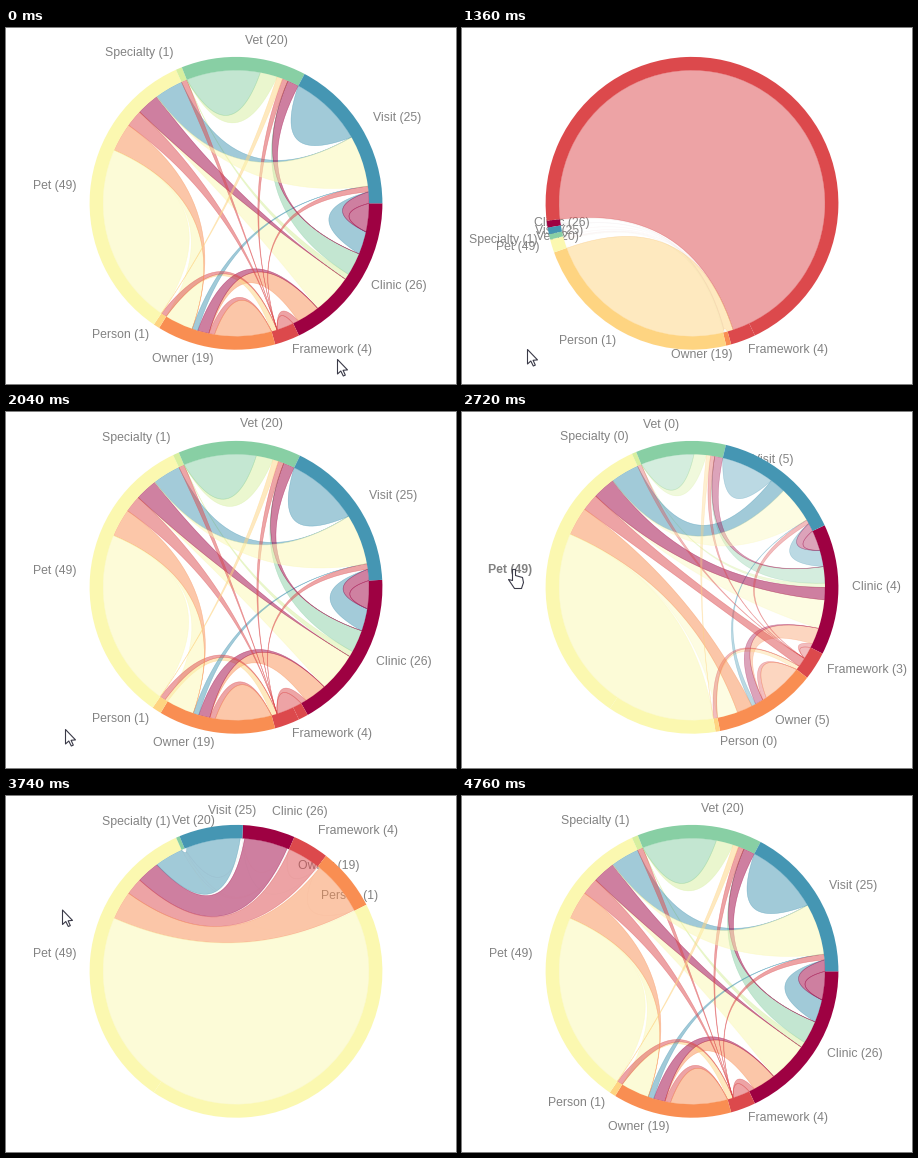
Write a matplotlib script that moves like this. It is 450 px wide and 356 px high and loops after 5120 ms.

```python
import numpy as np
import matplotlib.pyplot as plt
from matplotlib.animation import FuncAnimation
from matplotlib.patches import Polygon, Wedge

WIDTH, HEIGHT, DPI = 450, 356, 100
LOOP, TICK, STEP = 5120, 20, 340
CENTER = np.array([230.0, 175.3])
OUTER, INNER, LABEL_R = 146.4, 133, 160

COLORS = {"Clinic": "#9e0142", "Framework": "#dc494c", "Owner": "#f98e52",
          "Person": "#fed481", "Pet": "#fbf8b0", "Specialty": "#d7ef9f",
          "Vet": "#88cfa4", "Visit": "#4596b3"}
NAMES = list(COLORS)
N = len(NAMES)

# References from each group to the others
REFERENCES = {
    "Clinic": dict(Clinic=5, Visit=4, Vet=4, Specialty=1, Pet=7, Owner=4, Framework=1),
    "Framework": dict(Framework=3, Person=1),
    "Owner": dict(Owner=10, Framework=1, Clinic=2, Visit=1, Pet=5),
    "Person": dict(Framework=1),
    "Pet": dict(Pet=32, Owner=5, Framework=3, Clinic=4, Visit=5),
    "Specialty": dict(Framework=1),
    "Vet": dict(Vet=13, Specialty=3, Person=1, Framework=1, Clinic=2),
    "Visit": dict(Visit=13, Pet=9, Framework=1, Clinic=2),
}
LINKS = np.array([[REFERENCES[a].get(b, 0) for b in NAMES] for a in NAMES])
TOTALS = LINKS.sum(axis=1)
UNIT = 360 / TOTALS.sum()
ENDS = np.cumsum(TOTALS) * UNIT
STARTS = ENDS - TOTALS * UNIT

# (start, duration, group, pointer enters it)
HOVERS = [(57, 1087, "Framework", True), (1121, 1087, "Framework", False),
          (2327, 955, "Pet", True), (3513, 1172, "Pet", False)]

# Pointer path as (time, x, y)
POINTER_PATH = [(0, 331, 331), (680, 330, 323), (1020, 330, 323), (1360, 65, 321),
                (2040, 59, 317), (2380, 50, 157), (3400, 50, 157), (4080, 62, 70)]
ARROW = [(0, 0), (0, 14.5), (3.3, 11.5), (5.8, 16.5), (7.8, 15.6), (5.6, 10.8), (10, 10.4)]
HAND = [(0, 0), (3, 0), (3, 6), (10, 8), (11, 13), (9, 19), (2, 19), (-4, 10), (0, 11)]


def ease(u):
    u = min(max(u, 0), 1)
    return 4 * u**3 if u < 0.5 else 1 - 4 * (1 - u)**3


def hover_state(t):
    """Focused group, how far the focus has opened, and whether it is hovered."""
    state = None, 0, False
    for start, duration, name, enters in HOVERS:
        if t >= start:
            p = ease((t - start) / duration)
            state = NAMES.index(name), p if enters else 1 - p, enters
    return state


def polar(radius, degrees):
    a = np.radians(degrees)
    return CENTER + radius * np.stack([np.cos(a), np.sin(a)], axis=-1)


def arc(a, b):
    return polar(INNER, np.linspace(a, b, int(abs(b - a) / 2) + 3))


def curve(a, b):
    """Quadratic curve whose control reaches the centre for distant ends."""
    gap = (b - a + 180) % 360 - 180
    pull = max(0, 1 - abs(gap) / 90)**2.25
    control = polar(INNER * pull, a + gap / 2)
    t = np.linspace(0, 1, 30)[:, None]
    return ((1 - t)**2 * polar(INNER, a) + 2 * t * (1 - t) * control
            + t**2 * polar(INNER, b))


def share(focus):
    """Degrees per reference when the focused group divides the rest of the ring."""
    return (360 - TOTALS[focus] * UNIT) / TOTALS[focus]


def spans(focus, p):
    """Start and end angle of every group; the focused one keeps its place."""
    if focus is None:
        return list(zip(STARTS, ENDS))
    result = [None] * N
    result[focus] = STARTS[focus], ENDS[focus]
    pos = ENDS[focus]
    for k in range(1, N):
        j = (focus + k) % N
        width = TOTALS[j] * UNIT * (1 - p) + p * share(focus) * LINKS[focus, j]
        result[j] = pos, pos + width
        pos += width
    return result


def slots(groups, focus, p):
    """Outgoing slot of each pair, and where the focused group's links land."""
    out, landing = {}, {}
    for i in range(N):
        pos = groups[i][0]
        scale = UNIT if i == focus or focus is None else UNIT * (1 - p)
        for k in range(N):
            j = (i - k) % N
            if j == focus and i != focus:
                width = p * share(focus) * LINKS[focus, i]
                landing[i] = pos, pos + width
                pos += width
            out[i, j] = pos, pos + LINKS[i, j] * scale
            pos = out[i, j][1]
    if focus is not None:
        landing[focus] = groups[focus - 1][1], groups[focus][0] + 360
    return out, landing


def draw_chords(groups, focus, p):
    out, landing = slots(groups, focus, p)
    for i, j in zip(*np.nonzero(LINKS)):
        a0, a1 = out[i, j]
        b0, b1 = landing[j] if i == focus else (out[j, i][0],) * 2
        alpha = 0.5 if i == focus else 0.5 * (1 - p)
        color = COLORS[NAMES[j]]
        points = np.vstack([arc(a0, a1), curve(a1, b0), arc(b0, b1), curve(b1, a0)])
        ax.add_patch(Polygon(points, facecolor=color, edgecolor=color,
                             lw=0.4, alpha=alpha, zorder=2))


def draw_ring(groups, focus):
    pieces = [(name, *span) for name, span in zip(NAMES, groups)]
    if focus is not None:
        pieces.append((NAMES[focus], groups[focus - 1][1], groups[focus][0] + 360))
    for name, a, b in pieces:
        if b - a > 0.02:
            ax.add_patch(Wedge(CENTER, OUTER, a, b, width=OUTER - INNER,
                               facecolor=COLORS[name], lw=0, zorder=3))


def draw_labels(groups, focus, over):
    goal = spans(focus if over else None, 1)
    for j, name in enumerate(NAMES):
        x, y = polar(LABEL_R, sum(groups[j]) / 2)
        hovered = over and j == focus
        count = LINKS[focus, j] if over and not hovered else TOTALS[j]
        left = np.cos(np.radians(sum(goal[j]) / 2)) < 0
        ax.text(x, y, f"{name} ({count})", ha="right" if left else "left", va="baseline",
                family="Liberation Sans", size=12.3 * 72 / DPI, color="#828282",
                weight="bold" if hovered else "normal", zorder=1)


def draw_pointer(t, over):
    times, xs, ys = zip(*POINTER_PATH)
    if t > times[-1]:
        return
    tip = np.array([np.interp(t, times, xs), np.interp(t, times, ys)]) + 0.5
    shape = tip + np.array(HAND if over else ARROW)
    ax.add_patch(Polygon(shape, facecolor="white", edgecolor="#3a3a48", lw=0.8,
                         joinstyle="round", zorder=5))


fig = plt.figure(figsize=(WIDTH / DPI, HEIGHT / DPI), dpi=DPI, facecolor="white")
ax = fig.add_axes([0, 0, 1, 1], xlim=(0, WIDTH), ylim=(HEIGHT, 0))
ax.axis("off")
shown = {"time": None}


def update(frame):
    # The picture only changes every STEP; the last picture stays a little longer
    t = min(frame * TICK // STEP, LOOP // STEP - 1) * STEP
    if t == shown["time"]:
        return
    shown["time"] = t
    for artist in [*ax.patches, *ax.texts]:
        artist.remove()
    focus, p, over = hover_state(t)
    groups = spans(focus, p)
    draw_labels(groups, focus, over)
    draw_chords(groups, focus, p)
    draw_ring(groups, focus)
    draw_pointer(t, over)


animation = FuncAnimation(fig, update, frames=LOOP // TICK, interval=TICK,
                          repeat=True, repeat_delay=0, cache_frame_data=False)
plt.show()
```
